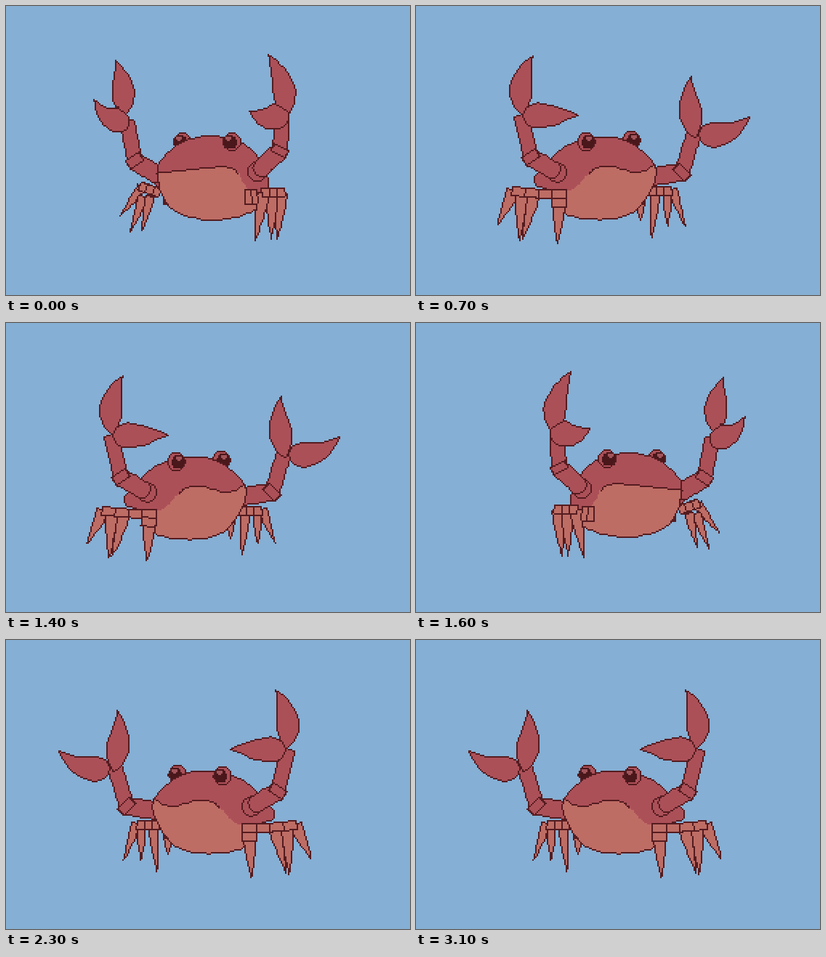
Write an HTML page with a canvas that moves like this. It is 556 px wide and 398 px high and loops after 3.2 s.

```html
<!DOCTYPE html>
<html lang="en">
<head>
<meta charset="utf-8">
<title>Dancing crab</title>
<style>
html, body { margin: 0; width: 100%; height: 100%; overflow: hidden; background: #85afd4; }
canvas { display: block; width: 556px; height: 398px; image-rendering: pixelated; }
</style>
</head>
<body>
<canvas id="stage" width="278" height="199"></canvas>
<script>
const ctx = document.getElementById('stage').getContext('2d');
const SKY = '#85afd4', SHELL = '#ac5058', BELLY = '#be6d65', LINE = '#551c20', EYE = '#4a171b', GLINT = '#a0545a';

// Key joints of the two poses: coiled for the turn, and landed with open claws.
// A finger is base, control, tip; a leg is knee, tip.
const coiled = {
  mirrorSum: 286,
  gaze: -3,
  body: [[208, 228], [226, 199], [256, 182], [296, 180], [336, 196], [361, 238], [352, 274], [318, 290], [272, 294], [224, 276]],
  seam: [[206, 230], [240, 227], [285, 222], [310, 223], [319, 230], [330, 250], [348, 266]],
  left: {
    eye: [243, 187],
    shoulder: [214, 236], elbow: [177, 213], wrist: [166, 158],
    thumb: [[169, 152], [144, 168], [121, 129]],
    finger: [[160, 152], [166, 112], [151, 74]],
    coxa: [[216, 262], [220, 262]],
    row: [[212, 258], [184, 248]],
    legs: [[[187, 248], [156, 288]], [[198, 262], [187, 308]], [[188, 262], [171, 310]], [[198, 262], [187, 308]]]
  },
  right: {
    eye: [311, 187],
    shoulder: [346, 228], elbow: [377, 199], wrist: [380, 154],
    thumb: [[388, 146], [358, 162], [335, 144]],
    finger: [[382, 154], [391, 106], [360, 67]],
    coxa: [[329, 263], [346, 262]],
    row: [[352, 257], [384, 256]],
    legs: [[[366, 260], [365, 320]], [[379, 258], [373, 320]], [[366, 260], [365, 320]], [[354, 258], [343, 322]]]
  }
};
const landed = {
  mirrorSum: 265,
  gaze: 3,
  body: [[162, 240], [200, 197], [248, 181], [292, 187], [328, 219], [323, 253], [296, 285], [252, 294], [206, 286], [190, 258]],
  seam: [[206, 258], [226, 245], [238, 231], [250, 222], [272, 221], [304, 229], [328, 219]],
  left: {
    eye: [234, 187],
    shoulder: [194, 229], elbow: [158, 208], wrist: [144, 150],
    thumb: [[146, 150], [182, 152], [222, 150]],
    finger: [[148, 150], [136, 104], [160, 69]],
    coxa: [[197, 253], [196, 277]],
    row: [[187, 260], [132, 255]],
    legs: [[[133, 254], [112, 301]], [[162, 260], [146, 320]], [[145, 260], [142, 322]], [[197, 274], [194, 326]]]
  },
  right: {
    eye: [296, 185],
    shoulder: [316, 236], elbow: [366, 229], wrist: [382, 176],
    thumb: [[388, 174], [428, 186], [459, 153]],
    finger: [[385, 181], [372, 138], [378, 97]],
    coxa: [[312, 262], [308, 262]],
    row: [[320, 256], [352, 255]],
    legs: [[[309, 266], [309, 294]], [[353, 252], [370, 302]], [[346, 260], [346, 302]], [[330, 256], [324, 318]]]
  }
};

function mix(a, b, t) {
  if (typeof a === 'number') return a + (b - a) * t;
  if (Array.isArray(a)) return a.map((v, i) => mix(v, b[i], t));
  return Object.fromEntries(Object.keys(a).map(key => [key, mix(a[key], b[key], t)]));
}

// Catmull-Rom curve through the given points.
function smooth(points, closed, steps = 8) {
  const n = points.length;
  const at = i => points[closed ? (i + n) % n : Math.min(n - 1, Math.max(0, i))];
  const curve = [];
  for (let i = 0; i < (closed ? n : n - 1); i++) {
    const [a, b, c, d] = [at(i - 1), at(i), at(i + 1), at(i + 2)];
    for (let s = 0; s < steps; s++) {
      const u = s / steps;
      curve.push([0, 1].map(k => b[k] + u / 2 * (c[k] - a[k]
        + u * (2 * a[k] - 5 * b[k] + 4 * c[k] - d[k] + u * (3 * (b[k] - c[k]) + d[k] - a[k])))));
    }
  }
  if (!closed) curve.push(points[n - 1]);
  return curve;
}

// Closed outline around a quadratic spine; width(u) is half the thickness.
function strip([a, b, c], width, steps = 14) {
  const one = [], other = [];
  for (let i = 0; i <= steps; i++) {
    const u = i / steps, from = mix(a, b, u), to = mix(b, c, u);
    const [x, y] = mix(from, to, u);
    const dx = to[0] - from[0], dy = to[1] - from[1], w = width(u) / (Math.hypot(dx, dy) || 1);
    one.push([x - dy * w, y + dx * w]);
    other.unshift([x + dy * w, y - dx * w]);
  }
  return one.concat(other);
}

const bar = (a, b, width) => strip([a, mix(a, b, 0.5), b], width);
const disc = ([x, y], r) => Array.from({ length: 16 }, (_, i) =>
  [x + r * Math.cos(i * Math.PI / 8), y + r * Math.sin(i * Math.PI / 8)]);
const even = w => () => w;
const roundStart = w => u => w * Math.sqrt(1 - Math.max(0, 1 - u * 4) ** 2);
const leaf = (w, skew) => u => w * Math.sin(Math.PI * u ** skew);
const spike = w => u => w * (1 - u ** 1.6);

function spans(points, y) {
  const hits = [];
  points.forEach(([x1, y1], i) => {
    const [x2, y2] = points[(i + 1) % points.length];
    if ((y1 <= y) !== (y2 <= y)) hits.push(x1 + (y - y1) / (y2 - y1) * (x2 - x1));
  });
  return hits.sort((a, b) => a - b);
}

// Hard-edged fill, optionally kept inside a mask polygon.
function fill(points, color, mask) {
  ctx.fillStyle = color;
  const ys = points.map(p => p[1]);
  for (let y = Math.min(...ys); y <= Math.max(...ys); y++) {
    const hits = spans(points, y);
    const limits = mask ? spans(mask, y) : [0, 278];
    for (let i = 0; i + 1 < hits.length; i += 2) {
      const from = Math.ceil(Math.max(hits[i], limits[0]));
      const to = Math.floor(Math.min(hits[i + 1], limits.at(-1)));
      if (to >= from) ctx.fillRect(from, y, to - from + 1, 1);
    }
  }
}

function stroke(points, closed = true) {
  ctx.fillStyle = LINE;
  for (let k = closed ? 0 : 1; k < points.length; k++) {
    const p = points.at(k - 1), q = points[k];
    const n = Math.max(Math.abs(q[0] - p[0]), Math.abs(q[1] - p[1]), 1);
    for (let i = 0; i <= n; i++) {
      const [x, y] = mix(p, q, i / n);
      ctx.fillRect(Math.round(x), Math.round(y), 1, 1);
    }
  }
}

function drawCrab({ t, lift, bob, mirrored }) {
  const pose = mix(coiled, landed, t);
  const facingRight = t >= 0.5;
  const mirrorSum = Math.round(pose.mirrorSum);

  const sink = ([x, y]) => [x, y + bob];
  const stretch = ([x, y]) => [x, y + bob - Math.max(0, 175 - y) * 0.24 * lift];
  const plant = ([x, y]) => {
    const down = Math.min(1, Math.max(0, (y - 250) / 76));
    return [x + (x - 236) * bob * bob * 0.0002 * down, y + bob * (1 - 0.78 * down)];
  };
  const place = (points, move) => points.map(move).map(([x, y]) => {
    const px = Math.floor(x / 2);
    return [mirrored ? mirrorSum - px : px, Math.floor(y / 2)];
  });
  const drawPart = (points, color, move) => {
    const shape = place(points, move);
    fill(shape, color);
    stroke(shape);
  };

  const drawRow = ([a, b], count, half) => {
    for (let i = 0; i < count; i++) {
      drawPart(bar(mix(a, b, i / count), mix(a, b, (i + 1) / count), even(half)), BELLY, plant);
    }
  };
  const drawLegs = (side, half) => {
    side.legs.forEach(([knee, tip]) => {
      const bend = [mix(knee[0], tip[0], 0.4), mix(knee[1], tip[1], 0.5)];
      drawPart(strip([knee, bend, tip], spike(half)), BELLY, plant);
    });
    drawRow(side.row, 3, 6);
    drawRow(side.coxa, 2, 10);
  };
  const drawArm = ({ shoulder, elbow, wrist, thumb, finger }) => {
    const along = mix(shoulder, wrist, 0.07).map((v, i) => v - shoulder[i]);
    const before = elbow.map((v, i) => v - along[i]), after = elbow.map((v, i) => v + along[i]);
    const parts = [
      disc(shoulder, 13),
      bar(mix(shoulder, elbow, -0.1), elbow, roundStart(12)),
      bar(elbow, wrist, even(10)),
      bar(before, after, even(11)),
      strip(finger, leaf(15, 0.75)),
      strip(thumb, leaf(17, 0.6))
    ];
    parts.forEach(points => drawPart(points, SHELL, stretch));
  };
  const drawEye = ({ eye: [x, y] }) => {
    const ball = place(disc([x, y], 12), sink);
    fill(ball, SHELL);
    fill(place(disc([x + pose.gaze, y + 1], 9), sink), EYE);
    stroke(ball);
    fill(place(disc([x + pose.gaze * 1.5, y - 4], 3), sink), GLINT);
  };
  const drawBody = () => {
    const outline = place(smooth(pose.body, true), sink);
    const seam = place(smooth(pose.seam, false), sink);
    const first = seam[0], last = seam.at(-1);
    fill(outline, SHELL);
    fill([...seam, [last[0], 160], [first[0], 160]], BELLY, outline);
    stroke(facingRight ? seam.slice(16) : seam.slice(0, 33), false);
    stroke(outline);
  };

  const [far, near] = facingRight ? [pose.right, pose.left] : [pose.left, pose.right];
  drawLegs(far, 6);
  drawArm(far);
  drawEye(far);
  drawBody();
  drawEye(near);
  drawLegs(near, 8);
  drawArm(near);
}

// A three-step turn, then bobbing in place; the second half is mirrored.
function danceAt(ms) {
  const step = Math.floor(ms / 100) % 32, k = step % 16;
  const turning = k < 3;
  return {
    t: turning ? k * 0.35 : 1,
    lift: turning ? k / 2 : 0,
    bob: turning ? 0 : 4 - 4 * Math.cos((k - 3) * Math.PI / 2),
    mirrored: step >= 16
  };
}

function frame(now) {
  ctx.fillStyle = SKY;
  ctx.fillRect(0, 0, 278, 199);
  drawCrab(danceAt(now));
  requestAnimationFrame(frame);
}
requestAnimationFrame(frame);
</script>
</body>
</html>
```
